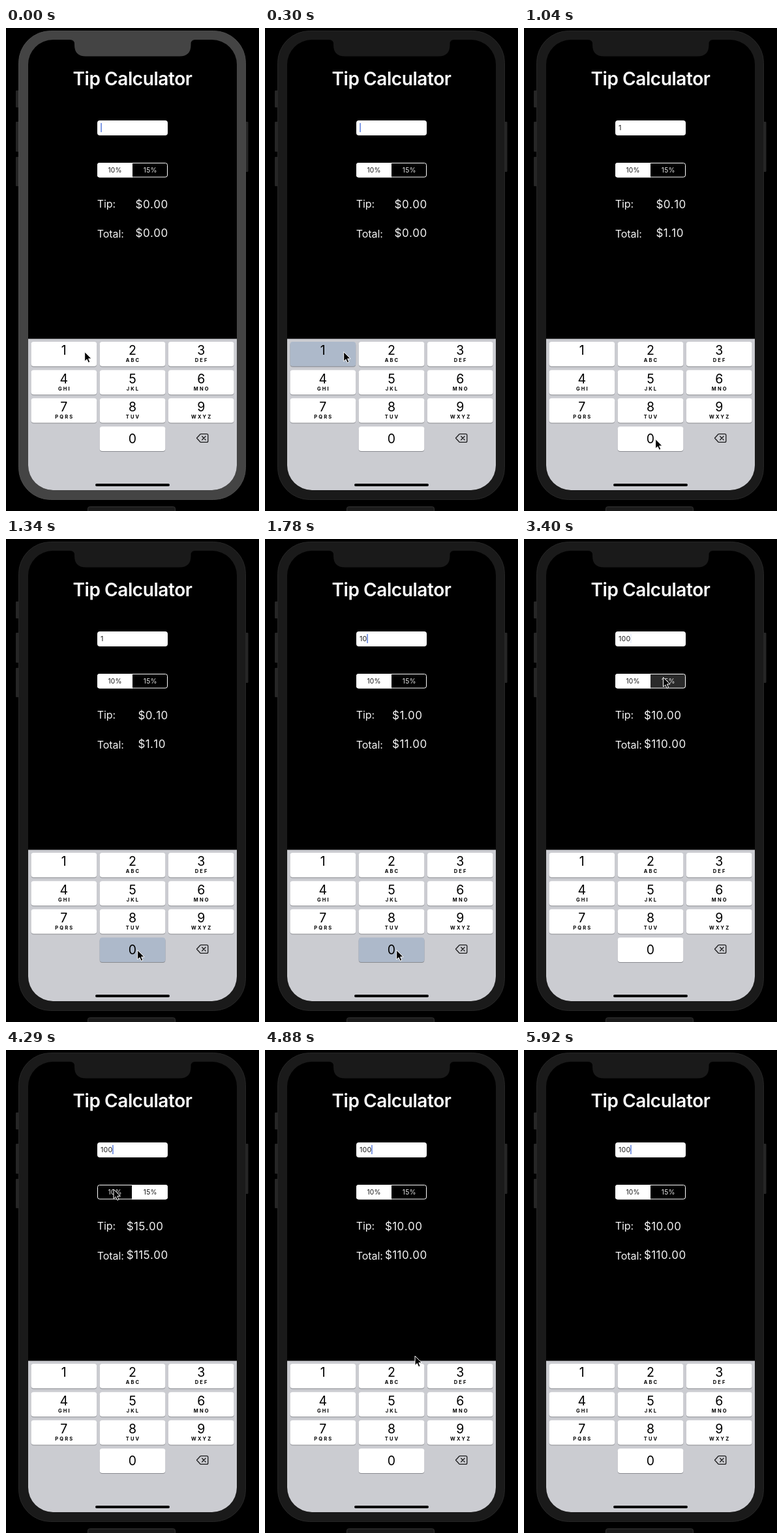
Animation of 388 by 742 pixels, one loop 6220 ms. Source, as an HTML page:

```html
<!DOCTYPE html>
<html lang="en">
<head>
<meta charset="utf-8">
<title>Tip Calculator</title>
<style>
  html, body { margin: 0; width: 100%; height: 100%; overflow: hidden; background: #000; }
  svg { display: block; width: 100%; height: 100%; font-family: Inter, Roboto, sans-serif; }
  .title { font-size: 28px; font-weight: 600; letter-spacing: -.43px; fill: #fff; }
  .label { font-size: 16px; letter-spacing: -.05px; fill: #f4f4f4; }
  .money { font-size: 17px; letter-spacing: .4px; font-kerning: none; fill: #f4f4f4; }
  .amount { font-size: 10.7px; letter-spacing: .25px; fill: #181818; }
  .small { font-size: 10.2px; letter-spacing: .2px; }
  .digit { font-size: 19.5px; }
  .letters { font-size: 7.5px; font-weight: 700; letter-spacing: 2.1px; }
  .mid { text-anchor: middle; }
</style>
</head>
<body>
<svg viewBox="0 0 388 742">
  <rect width="388" height="742"/>
  <g fill="#262626">
    <rect x="15" y="96" width="5" height="26" rx="1"/>
    <rect x="15" y="144" width="5" height="46" rx="1"/>
    <rect x="15" y="198" width="5" height="45" rx="1"/>
    <rect x="367" y="144" width="4.5" height="77" rx="1"/>
  </g>
  <rect x="125.5" y="735.5" width="134" height="12" rx="3" fill="#1b1b1b" stroke="#333"/>

  <rect id="bezel" x="19.5" y="4.5" width="348" height="720" rx="49"/>
  <clipPath id="screen"><rect x="34" y="18" width="320" height="692" rx="38"/></clipPath>
  <g clip-path="url(#screen)">
    <rect x="34" y="18" width="320" height="692"/>
    <rect x="34" y="477.5" width="320" height="233" fill="#cbccd1"/>
  </g>
  <path id="notch" d="M98 17.5H290V18q-6.5 0-6.5 6.5V26q0 17.5-17.5 17.5H122.5q-17.5 0-17.5-17.5V24.5q0-6.5-7-6.5z"/>

  <text class="title mid" x="194" y="87.5">Tip Calculator</text>
  <rect x="140" y="142" width="108" height="23" rx="4" fill="#fff"/>
  <text id="amount" class="amount" x="145" y="157.3"></text>
  <rect id="caret" y="146" width="1.3" height="14" fill="#4169d8"/>

  <clipPath id="pill"><rect x="140" y="207" width="108" height="22.5" rx="3.5"/></clipPath>
  <g clip-path="url(#pill)">
    <rect id="seg10" x="140" y="207" width="54" height="23"/>
    <rect id="seg15" x="194" y="207" width="54" height="23"/>
    <rect x="193" y="207" width="1" height="23" fill="#fff"/>
  </g>
  <rect x="140.5" y="207.5" width="107" height="21.5" rx="3" fill="none" stroke="#fff"/>
  <text id="text10" class="small mid" x="167" y="221.7">10%</text>
  <text id="text15" class="small mid" x="221.2" y="221.7">15%</text>

  <text class="label" x="139.7" y="276.3">Tip:</text>
  <text class="label" x="139.7" y="321.7">Total:</text>
  <text id="tip" class="money" y="277"></text>
  <text id="total" class="money" y="321.3"></text>

  <g id="keys"></g>
  <g fill="none" stroke="#1c1c1e" stroke-width="1.3" stroke-linejoin="round" stroke-linecap="round">
    <path d="M292.5 630l5.2-5.7q.7-.7 1.6-.7h8.500q2 0 2 2v8.800q0 2-2 2h-8.500q-.9 0-1.600-.7z"/>
    <path d="M300.700 627.300l5.400 5.400m0-5.400l-5.400 5.400"/>
  </g>
  <rect x="137" y="700" width="114" height="4" rx="2"/>
  <path id="pointer" d="M0 0V14.500L3.300 11.500 5.600 16.700 8.100 15.600 5.900 10.500H10.400Z" stroke="#fff" stroke-width="1"/>
</svg>
<script>
const LOOP = 6220, TICKS = 42;
const $ = id => document.getElementById(id);
const set = (el, attrs) => { for (const k in attrs) el.setAttribute(k, attrs[k]); };

// Keypad
const letters = ["", "ABC", "DEF", "GHI", "JKL", "MNO", "PQRS", "TUV", "WXYZ"];
function key(digit, col, row, sub) {
  const x = 38.5 + col * 105.2, y = 482 + row * 43.4, mid = x + 50.3;
  return `<rect x="${x}" y="${y + 1}" width="100.7" height="37.8" rx="4" fill="#898b90"/>
    <rect id="key${digit}" x="${x}" y="${y}" width="100.7" height="37.8" rx="4"/>
    <text class="digit mid" x="${mid}" y="${y + (sub === null ? 25.3 : 20.3)}">${digit}</text>
    <text class="letters mid" x="${mid + 1}" y="${y + 31.4}">${sub || ""}</text>`;
}
$("keys").innerHTML =
  letters.map((sub, i) => key(i + 1, i % 3, Math.floor(i / 3), sub)).join("") + key(0, 1, 3, null);

// Every track is [tick, value...]
const typed = [[0, ""], [3, "1"], [10, "10"], [13, "100"]];
const rates = [[0, 10], [24, 15], [31, 10]];
const presses = [[0, ""], [2, "key1"], [3, ""], [9, "key0"], [10, ""], [12, "key0"], [13, ""],
  [23, "seg15"], [24, ""], [30, "seg10"], [31, ""]];
const caretAlpha = [[0, 1], [6, .5], [7, 0], [10, 1], [16, .75], [17, 0], [19, .5], [20, 1],
  [23, .15], [24, 0], [26, 1], [30, 0], [33, 1], [36, .5], [37, 0], [40, 1]];
const route = [[0, 120.7, 497.5], [3, 120.7, 497.5], [5, 160, 570], [7, 201.7, 631.5],
  [13, 201.7, 631.5], [15, 265, 380], [16, 219.5, 240.5], [18, 213.5, 212.5], [24, 213.5, 212.5],
  [28, 165, 214], [31, 165, 214], [33, 230, 470], [35, 291, 700], [TICKS, 291, 700]];
const caretX = [145.4, 149.7, 156.4, 163.3];

const at = (track, tick) => track.filter(k => k[0] <= tick).pop()[1];

function along(path, tick) {
  const i = path.findIndex(p => p[0] > tick), a = path[i - 1], b = path[i];
  const u = (tick - a[0]) / (b[0] - a[0]);
  return [a[1] + (b[1] - a[1]) * u, a[2] + (b[2] - a[2]) * u];
}

function draw(time) {
  const tick = Math.min(TICKS - 1, Math.floor((time % LOOP + 7) * TICKS / LOOP));
  const amount = at(typed, tick), rate = at(rates, tick), pressed = at(presses, tick);

  const active = tick >= 2;
  const body = active ? "#1a1a1a" : "#444";
  set($("bezel"), { fill: body, stroke: active ? "#262626" : "#4b4b4b" });
  set($("notch"), { fill: body });

  $("amount").textContent = amount;
  set($("caret"), { x: caretX[amount.length], opacity: at(caretAlpha, tick) });

  for (const value of [10, 15]) {
    const on = value === rate, id = "seg" + value;
    set($(id), { fill: on ? "#fff" : pressed === id ? "#2a2a2a" : "#000" });
    set($("text" + value), { fill: on ? "#111" : "#e8e8e8" });
  }
  for (let digit = 0; digit < 10; digit++)
    set($("key" + digit), { fill: pressed === "key" + digit ? "#adb9ca" : "#fff" });

  // The two sums share a left edge; the wider one ends at the right margin
  const tip = amount * rate / 100, sums = [$("tip"), $("total")];
  sums[0].textContent = "$" + tip.toFixed(2);
  sums[1].textContent = "$" + (+amount + tip).toFixed(2);
  const x = 248.6 - Math.max(...sums.map(el => el.getComputedTextLength()));
  sums.forEach(el => set(el, { x }));

  const [px, py] = along(route, tick);
  set($("pointer"), { transform: `translate(${px} ${py})`, visibility: tick < 37 ? "visible" : "hidden" });
}

const start = performance.now();
function loop() {
  draw(performance.now() - start);
  requestAnimationFrame(loop);
}
loop();
</script>
</body>
</html>
```
